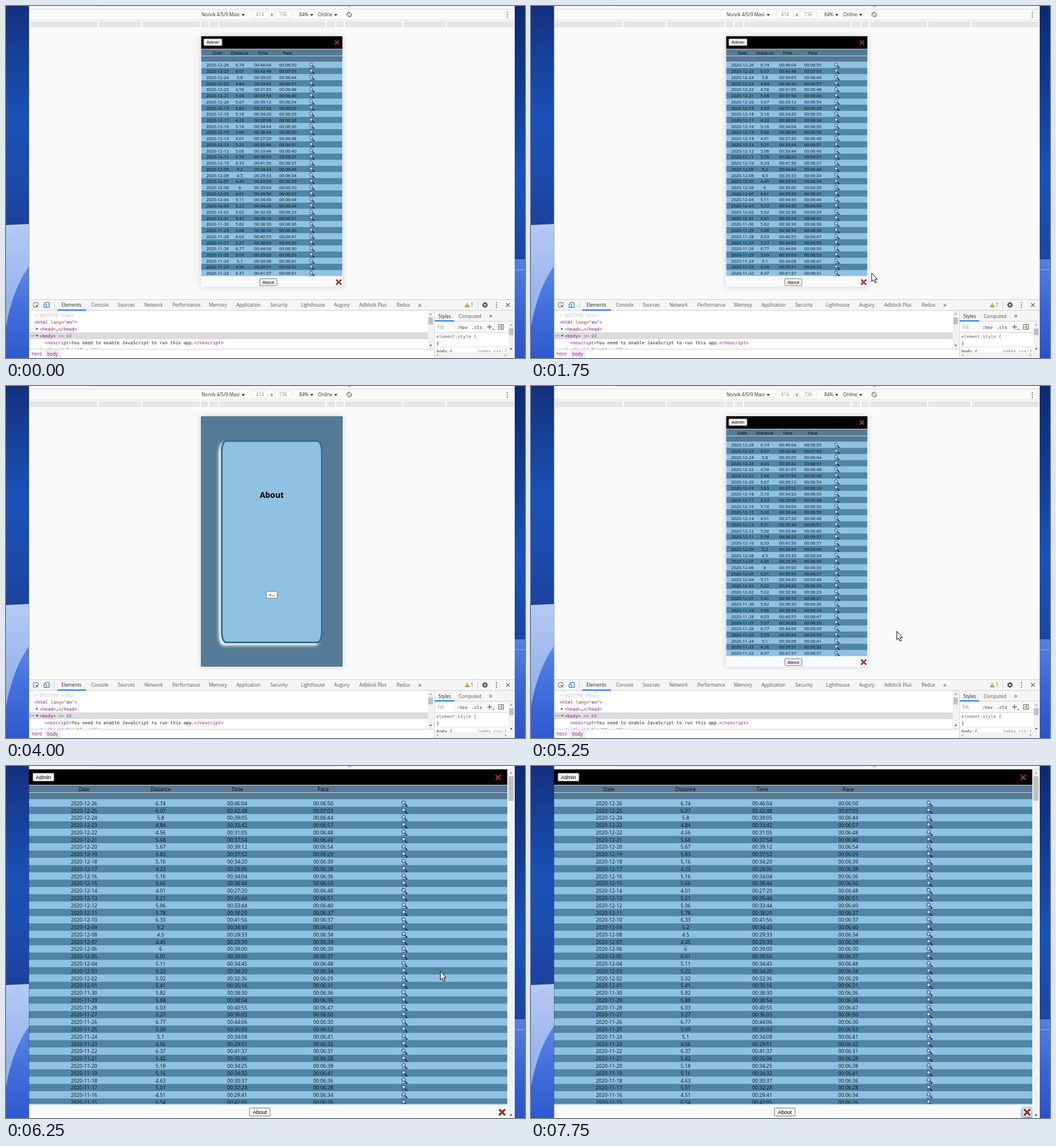
An HTML page with a canvas that plays this animation: 908 px wide and 617 px high, repeating every 8000 ms.

```html
<!DOCTYPE html>
<html lang="en">
<head>
<meta charset="utf-8">
<title>Running log</title>
<style>
html, body { margin: 0; width: 100%; height: 100%; overflow: hidden; background: #fff; }
canvas { display: block; }
</style>
</head>
<body>
<canvas id="stage" width="908" height="617"></canvas>
<script>
const ctx = document.getElementById('stage').getContext('2d');
const LOOP = 8000, STEP = 250;
const UI = '"Open Sans", "Noto Sans", sans-serif';
const ARIAL = '"Liberation Sans", Arial, sans-serif';
const MONO = '"DejaVu Sans Mono", monospace';
const STEEL = '#557a95', SKY = '#8fc1e3', MID = '#5085a5', DEEP = '#31708e', PAPER = '#f7f9fb';

// distance and time of each run, newest first
const RUNS = `6.74 46:04,6.07 42:48,5.8 39:05,4.84 33:42,4.56 31:05,5.68 37:54,5.67 39:12,
5.83 37:52,5.16 34:20,4.23 28:06,5.16 34:04,5.66 38:44,4.01 27:20,5.21 35:44,5.06 33:44,
5.78 38:20,6.33 41:56,5.2 34:43,4.5 29:33,4.45 29:39,6 39:00,6.01 39:50,5.11 34:45,
5.22 34:20,5.02 32:36,5.41 35:16,5.82 38:30,5.88 38:54,6.03 40:55,5.27 36:03,6.77 44:06,
5.09 35:03,5.1 34:08,4.56 29:51,6.37 41:37,5.42 35:06,5.18 34:25,5.16 34:32,4.63 30:37,
5.01 32:28,4.51 29:41,6.54 42:05`.split(',').map((run, i) => {
  const [dist, time] = run.trim().split(' ');
  const [min, sec] = time.split(':').map(Number);
  const pace = Math.floor((min * 60 + sec) / dist + 1e-6);
  const pad = n => String(n).padStart(2, '0');
  const date = new Date(Date.UTC(2020, 11, 26 - i)).toISOString().slice(0, 10);
  return [date, dist, '00:' + time, `00:${pad(Math.floor(pace / 60))}:${pad(pace % 60)}`];
});

const NARROW = {
  w: 247, h: 439, head: 22, title: 29.5, rule: 34, top: 44.8, pitch: 10.73, rows: 35, end: 421,
  cols: [28.5, 67.5, 107.5, 151.5], lens: 193.5, size: 7.6, btn: 7.9, k: 1,
  admin: [4.5, 4.5, 32, 12], close: [237.5, 11], about: [102.5, 425, 30, 12], cross: [240.5, 431]
};
const WIDE = {
  w: 837, h: 611, head: 27, title: 35, rule: 40, top: 52.6, pitch: 12.785, rows: 42, end: 586,
  cols: [96.5, 230.5, 364.5, 515], lens: 657, size: 8.8, btn: 9.4, k: 1.15,
  admin: [7, 6.5, 37, 14], close: [821, 14], about: [386, 593.5, 36, 14], cross: [828, 601]
};

// pointer per 250 ms step: [step, x, y, shape]; other steps show none
const POINTER = new Map([
  [1, 600, 560, 'arrow'], [2, 541, 514, 'hand'], [3, 566, 503, 'arrow'], [4, 586, 480, 'arrow'],
  [5, 597, 467, 'arrow'], [6, 597, 467, 'arrow'], [7, 596, 468, 'arrow'], [8, 595, 470, 'arrow'],
  [9, 592, 475, 'arrow'], [21, 640, 430, 'arrow'], [22, 790, 497, 'arrow'], [23, 879, 520, 'arrow'],
  [24, 880, 520, 'arrow'], [25, 760, 360, 'arrow'], [26, 610, 257, 'arrow'], [27, 553, 311, 'beam'],
  [28, 610, 378, 'arrow'], [29, 735, 490, 'arrow'], [30, 846, 598, 'arrow']
].map(([step, x, y, shape]) => [step, { x, y, shape }]));

function rect(x, y, w, h, fill) {
  ctx.fillStyle = fill;
  ctx.fillRect(x, y, w, h);
}

// y is the middle of the capitals
function text(str, x, y, size, color = '#222', align = 'left', family = UI, weight = '') {
  ctx.font = `${weight} ${size}px ${family}`;
  ctx.fillStyle = color;
  ctx.textAlign = align;
  ctx.fillText(str, x, y + size * 0.36);
}

function line(points, color, width = 1) {
  ctx.strokeStyle = color;
  ctx.lineWidth = width;
  ctx.beginPath();
  points.forEach(([x, y]) => ctx.lineTo(x, y));
  ctx.stroke();
}

function poly(points, fill, stroke) {
  ctx.beginPath();
  points.forEach(([x, y]) => ctx.lineTo(x, y));
  ctx.closePath();
  ctx.fillStyle = fill;
  ctx.fill();
  if (stroke) {
    ctx.strokeStyle = stroke;
    ctx.lineWidth = 1;
    ctx.stroke();
  }
}

function disc(x, y, r, fill, stroke, width = 1) {
  ctx.beginPath();
  ctx.arc(x, y, r, 0, Math.PI * 2);
  if (fill) { ctx.fillStyle = fill; ctx.fill(); }
  if (stroke) { ctx.strokeStyle = stroke; ctx.lineWidth = width; ctx.stroke(); }
}

function box(x, y, w, h, r, fill, stroke, width = 1) {
  ctx.beginPath();
  ctx.roundRect(x, y, w, h, r);
  if (fill) { ctx.fillStyle = fill; ctx.fill(); }
  if (stroke) { ctx.strokeStyle = stroke; ctx.lineWidth = width; ctx.stroke(); }
}

function tri(x, y, r, dir, fill) {
  const base = [[-r, -r * 0.6], [r, -r * 0.6], [0, r * 0.8]];
  const turn = { down: p => p, up: ([a, b]) => [a, -b], right: ([a, b]) => [b, a], left: ([a, b]) => [-b, a] }[dir];
  poly(base.map(turn).map(([a, b]) => [x + a, y + b]), fill);
}

function cross(x, y, r, color, width) {
  line([[x - r, y - r], [x + r, y + r]], color, width);
  line([[x + r, y - r], [x - r, y + r]], color, width);
}

function dots(x, y) {
  for (const d of [-4, 0, 4]) disc(x, y + d, 1, '#555');
}

function button(label, [x, y, w, h], size) {
  box(x, y, w, h, 1.5, '#f4f4f4', '#767676', 1);
  text(label, x + w / 2, y + h / 2, size, '#000', 'center', ARIAL);
}

function gradient(y0, y1, ...colors) {
  const g = ctx.createLinearGradient(0, y0, 0, y1);
  colors.forEach((c, i) => g.addColorStop(i / (colors.length - 1), c));
  return g;
}

function desktop() {
  rect(0, 0, 40, 617, gradient(0, 384, '#14307f', '#16429a', '#1a50b6', '#1c4cae', '#1c429e'));
  poly([[0, 384], [40, 382], [40, 617], [0, 617]], gradient(382, 617, '#b4caf4', '#9ab6ee', '#86a6ea'));
  ctx.beginPath();
  ctx.moveTo(41, 455);
  ctx.quadraticCurveTo(12, 495, 0, 562);
  ctx.lineTo(0, 617);
  ctx.lineTo(41, 617);
  ctx.fillStyle = gradient(455, 617, '#5b86e4', '#426dda', '#3059d0');
  ctx.fill();
  rect(889, 0, 19, 617, gradient(0, 445, '#0e2a72', '#123c92', '#1a52b8', '#1a46a4'));
  rect(889, 444, 19, 173, gradient(444, 617, '#5580e0', '#3a66d4', '#2c52c8'));
  rect(889, 461, 19, 2, '#6a98e4');
}

function browser(step) {
  rect(40, 0, 850, 617, '#fff');
  rect(40, 0, 850, 5, '#fbfbfb');
  rect(step < 2 ? 160 : 147, 0, 433, 1, '#dcdcdc');
  disc(601, -3, 4.5, null, '#999');
  rect(40, 5, 850, 1, '#d8d8d8');
}

function deviceBar() {
  rect(40, 6, 850, 509, '#fafafa');
  rect(40, 24, 850, 1, '#dcdcdc');
  rect(42, 27, 847, 10, '#e6e6e6');
  for (const x of [160, 236, 339, 354, 371, 559, 576, 591, 693, 769]) rect(x, 26, 2, 12, '#fdfdfd');
  const size = 8.1, gray = '#333';
  text('Norvik 4/5/9 Maxi', 342, 15.5, size, gray);
  text('84%', 513, 15.5, size, gray);
  text('Online', 546, 15.5, size, gray);
  for (const x of [415, 535, 577]) tri(x, 15.5, 2.7, 'down', '#333');
  [[430, '414'], [470.5, '736']].forEach(([x, n]) => {
    box(x, 9.5, 29, 12, 0, '#fff', '#e4e4e4');
    text(n, x + 14.5, 15.5, size, '#8a8a8a', 'center');
  });
  text('x', 465, 15.5, size, gray, 'center');
  ctx.save();
  ctx.translate(600.5, 15);
  ctx.rotate(-Math.PI / 4);
  box(-2, -3.5, 4, 7, 0.8, null, '#666');
  ctx.restore();
  disc(600.5, 15, 4.5, null, '#777', 0.8);
  dots(877, 15.5);
}

function code(parts, x, y) {
  for (const [str, color] of parts) {
    text(str, x, y, 7.76, color, 'left', MONO);
    x += ctx.measureText(str).width;
  }
}

function devtools(step) {
  const tag = '#881280', gray = '#c0c0c0', ink = '#222';
  rect(40, 514, 850, 103, '#fff');
  rect(40, 514, 850, 20, '#f5f5f5');
  rect(40, 514, 850, 1, '#d0d0d0');
  rect(40, 533, 850, 1, '#d0d0d0');
  if (step === 2) rect(508, 515, 57, 18, '#e6e6e6');

  box(48, 520, 8, 8, 1, null, '#666');
  poly([[51, 523], [58, 526], [55, 527], [54, 530]], '#444', '#f5f5f5');
  box(68.5, 519.5, 7, 9, 1, null, '#1a73e8', 1.2);
  box(66.5, 522.5, 4, 6, 1, '#f5f5f5', '#1a73e8', 1.2);
  rect(84, 518, 1, 13, '#d0d0d0');
  [['Elements', 97], ['Console', 149], ['Sources', 195.5], ['Network', 242], ['Performance', 291],
    ['Memory', 355], ['Application', 403], ['Security', 462.5], ['Lighthouse', 516], ['Augury', 574],
    ['Adblock Plus', 618], ['Redux', 683.5]
  ].forEach(([name, x], i) => text(name, x, 524.5, 8.1, i ? '#555' : '#222'));
  rect(90, 532, 50, 2, '#1a73e8');
  text('»', 721, 524, 12, '#555');
  poly([[807, 520], [811.5, 528], [802.5, 528]], '#c89a2c');
  rect(806.5, 522.5, 1, 3, '#fff');
  text('1', 813, 524.5, 8.1, '#555');
  rect(825, 518, 1, 13, '#d0d0d0');
  for (let i = 0; i < 8; i++) {
    const a = i * Math.PI / 4, c = Math.cos(a), s = Math.sin(a);
    line([[838 + c * 3, 524 + s * 3], [838 + c * 5, 524 + s * 5]], '#555', 2);
  }
  disc(838, 524, 2.7, null, '#555', 2);
  dots(858, 524);
  cross(878, 524, 3.2, '#555', 1.2);

  ctx.save();
  ctx.beginPath();
  ctx.rect(41, 534, 697, 67);
  ctx.clip();
  rect(41, 572, 697, 12, '#dcdcdc');
  code([['<!DOCTYPE html>', gray]], 50, 542);
  code([['<html ', tag], ['lang', '#994500'], ['="', tag], ['en', '#1a1aa6'], ['">', tag]], 50, 554);
  tri(54, 566, 2.4, 'right', '#555');
  code([['<head>', tag], ['…', ink], ['</head>', tag]], 59, 566);
  for (const x of [43, 46, 49]) disc(x, 578, 0.8, '#555');
  tri(54.5, 578, 2.4, 'down', '#555');
  code([['<body>', tag], [' == ', '#777']], 59, 578);
  text('$0', 105.5, 578, 7.76, '#777', 'left', MONO, 'italic');
  code([['<noscript>', tag], ['You need to enable JavaScript to run this app.', ink], ['</noscript>', tag]], 68, 590);
  tri(63, 602, 2.4, 'right', '#555');
  code([['<div ', tag], ['id', '#994500'], ['="', tag], ['root', '#1a1aa6'], ['">', tag], ['…', ink], ['</div>', tag]], 68, 602);
  ctx.restore();

  rect(738, 534, 10, 67, '#f1f1f1');
  rect(739, 546, 8, 12, '#c1c1c1');
  tri(743, 540, 2.2, 'up', '#999');
  tri(743, 595, 2.2, 'down', '#505050');
  rect(40, 601, 709, 1, '#d0d0d0');
  rect(68, 602, 28, 15, '#eee');
  text('html', 45, 610.5, 8.1, tag);
  text('body', 72, 610.5, 8.1, tag);

  rect(749, 534, 1, 83, '#d0d0d0');
  rect(750, 534, 139, 19, '#f5f5f5');
  rect(750, 552, 139, 1, '#d0d0d0');
  text('Styles', 756.5, 544, 8.1, '#222');
  text('Computed', 792, 544, 8.1, '#555');
  text('»', 845, 543, 12, '#555');
  rect(750, 551, 34, 2, '#1a73e8');
  rect(782, 553, 107, 19, '#f8f8f8');
  text('Filt', 755, 563, 8.1, '#888');
  text(':hov', 789, 563, 7.7, '#333', 'left', MONO);
  text('.cls', 814.5, 563, 7.7, '#333', 'left', MONO);
  line([[842, 562.5], [850, 562.5]], '#555', 1.2);
  line([[846, 558.5], [846, 566.5]], '#555', 1.2);
  tri(852.5, 567, 1.6, 'down', '#555');
  box(861.5, 558.5, 9, 8, 0, null, '#666');
  line([[867.5, 558.5], [867.5, 566.5]], '#666');
  tri(864.5, 562.5, 1.9, 'left', '#666');
  rect(750, 572, 129, 1, '#d8d8d8');
  code([['element.style {', '#666']], 753, 579);
  code([['}', ink]], 753, 591);
  rect(750, 597, 129, 1, '#ddd');
  code([['body {', ink]], 753, 605);
  code([['index.css:1', '#777']], 825, 605);
  rect(879, 554, 10, 53, '#f1f1f1');
  rect(880, 565, 8, 12, '#c1c1c1');
  tri(884, 559, 2.2, 'up', '#999');
  tri(884, 601, 2.2, 'down', '#505050');
  rect(750, 607, 139, 10, '#f1f1f1');
  tri(755, 612, 2.2, 'left', '#aaa');
  tri(874, 612, 2.2, 'right', '#aaa');
}

function lens(x, y, k) {
  ctx.save();
  ctx.translate(x, y);
  ctx.scale(k, k);
  rect(-4.5, 4, 8, 0.8, '#3a46a8');
  line([[0.8, 0.8], [4.6, 4.6]], '#1d2430', 1.5);
  disc(-1.2, -1.2, 2.6, '#b4d8f0', '#33485c', 0.9);
  ctx.restore();
}

function log(L, x, y, { hover = -1, hot = false, glow = false }) {
  ctx.save();
  ctx.translate(x, y);
  rect(0, 0, L.w, L.head, '#000');
  button('Admin', L.admin, L.btn);
  cross(...L.close, 3.8 * L.k, L === WIDE || hot ? '#d23c22' : '#b63a28', 1.6 * L.k);
  rect(0, L.head, L.w, L.top - L.head, STEEL);
  rect(0, L.head, L.w, 1, '#cfdde8');
  rect(0, L.rule, L.w, 1, '#c3d3df');
  ['Date', 'Distance', 'Time', 'Pace'].forEach((name, i) =>
    text(name, L.cols[i], L.title, L.size, '#000', 'center'));

  ctx.save();
  ctx.beginPath();
  ctx.rect(0, 0, L.w, L.end);
  ctx.clip();
  rect(0, L.top, L.w, L.rows * L.pitch, SKY);
  for (let i = 0; i < L.rows; i++) {
    const top = L.top + i * L.pitch;
    // digits sit a little below the middle of the row
    const mid = top + L.pitch / 2 + L.size * 0.065;
    if (i % 2 || i === hover) rect(0, top, L.w, L.pitch, i === hover ? DEEP : MID);
    RUNS[i].forEach((cell, c) => text(cell, L.cols[c], mid, L.size, '#0b1218', 'center'));
    lens(L.lens, mid, L.k);
  }
  ctx.restore();

  rect(0, L.end, L.w, L.h - L.end, PAPER);
  if (L === WIDE) rect(0, L.end, L.w, 1.5, SKY);
  button('About', L.about, L.btn);
  const [cx, cy] = L.cross;
  if (glow) {
    ctx.save();
    ctx.shadowColor = DEEP;
    ctx.shadowBlur = 5;
    ctx.shadowOffsetY = 2;
    box(cx - 8, cy - 8, 16, 16, 1, '#fff', SKY, 1);
    ctx.restore();
  }
  cross(cx, cy, 4.4 * L.k, hot ? '#2a0805' : '#5a2018', 2.7 * L.k);
  cross(cx, cy, 3.9 * L.k, hot ? '#e0351c' : '#b83c2a', 1.5 * L.k);
  ctx.restore();
}

function aboutPage() {
  rect(341, 53, 248, 439, STEEL);
  const round = { x: 9, y: 18 };
  ctx.save();
  ctx.shadowColor = '#fff';
  ctx.shadowBlur = 5;
  ctx.shadowOffsetX = -4;
  ctx.shadowOffsetY = 4;
  box(376, 95, 178, 356, round, DEEP);
  ctx.restore();
  box(377.5, 96.5, 175, 353, { x: 8, y: 17 }, SKY, DEEP, 3);
  text('About', 465, 191, 13.9, '#000', 'center', UI, 'bold');
  button('<--', [455.5, 360, 19, 12], 7.9);
}

function phone(step) {
  ctx.save();
  ctx.shadowColor = 'rgba(0,0,0,0.16)';
  ctx.shadowBlur = 10;
  rect(341, 53, 248, 439, PAPER);
  ctx.restore();
  if (step >= 15 && step < 20) aboutPage();
  else log(NARROW, 341.5, 53, { hot: step >= 10 });
}

function scrollbar() {
  rect(877, 6, 12, 611, '#f1f1f1');
  rect(879, 18, 9, 43, '#c1c1c1');
  tri(883.5, 12, 2.4, 'up', '#a0a0a0');
  tri(883.5, 612, 2.4, 'down', '#505050');
}

function pointer({ x, y, shape }) {
  ctx.save();
  ctx.translate(x, y);
  ctx.lineJoin = 'round';
  if (shape === 'arrow') {
    poly([[0, 0], [0, 15], [3.3, 12], [5.7, 17.3], [8, 16.3], [5.7, 11], [10, 11]], '#fff', '#000');
  } else if (shape === 'beam') {
    line([[0, -6], [0, 6]], '#e4edf3', 1.2);
    for (const end of [-6, 6]) line([[-2, end], [2, end]], '#e4edf3');
  } else {
    ctx.beginPath();
    ctx.roundRect(-2, 0, 3.6, 13, 1.8);
    ctx.moveTo(-2, 12);
    ctx.lineTo(-5, 9.5);
    ctx.quadraticCurveTo(-7.5, 9.5, -6, 12);
    ctx.lineTo(-2, 18);
    ctx.lineTo(-2, 20.5);
    ctx.lineTo(6, 20.5);
    ctx.quadraticCurveTo(8.5, 16, 8.2, 10);
    ctx.quadraticCurveTo(7, 7, 1.6, 7);
    ctx.strokeStyle = '#000';
    ctx.lineWidth = 2;
    ctx.stroke();
    ctx.fillStyle = '#fff';
    ctx.fill();
    for (const fx of [1.8, 4, 6.2]) line([[fx, 8], [fx, 12]], '#000', 0.8);
  }
  ctx.restore();
}

function rowUnder(step) {
  const p = POINTER.get(step);
  if (!p || step < 26 || p.y > 6 + WIDE.end) return -1;
  return Math.floor((p.y - 6 - WIDE.top) / WIDE.pitch);
}

function draw(step) {
  desktop();
  browser(step);
  if (step < 24) {
    deviceBar();
    phone(step);
    devtools(step);
  } else if (step === 24) {
    log(NARROW, 40.5, 5.5, { hot: true });
  } else {
    // the row highlight trails the pointer by one step
    log(WIDE, 40, 6, { hover: rowUnder(step - 1), hot: true, glow: step === 31 });
    scrollbar();
  }
  rect(40, 0, 1, 617, 'rgba(20,30,60,0.35)');
  if (POINTER.has(step)) pointer(POINTER.get(step));
}

const start = performance.now();
function tick() {
  draw(Math.floor((performance.now() - start) % LOOP / STEP));
  requestAnimationFrame(tick);
}
tick();
</script>
</body>
</html>
```
